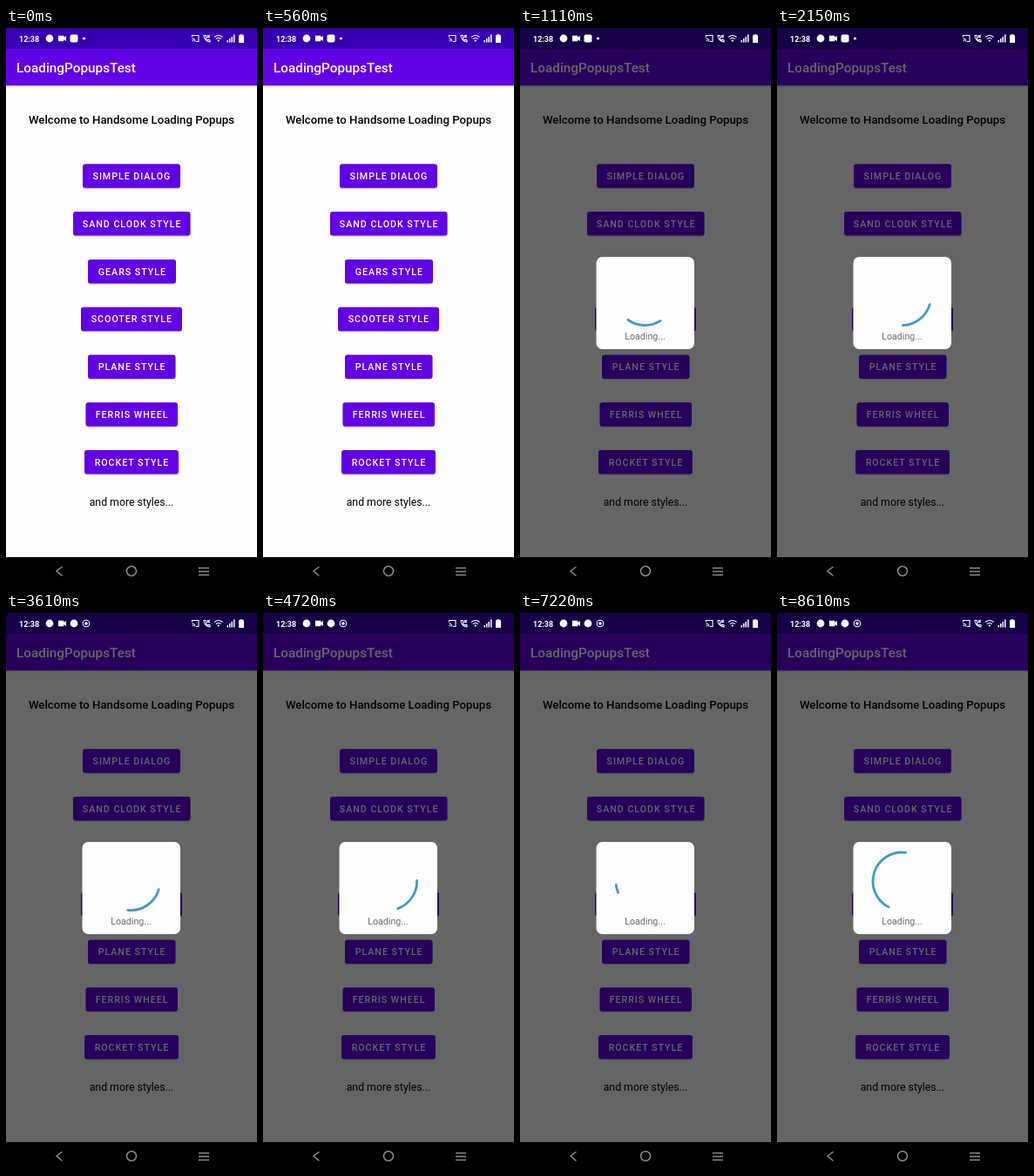
Write an HTML page that moves like this. It is 288 px wide and 640 px high and loops after 8680 ms.

```html
<!DOCTYPE html>
<html lang="en">
<head>
<meta charset="utf-8">
<title>Loading popup</title>
<style>
  html, body { margin: 0; width: 100%; height: 100%; overflow: hidden; background: #000; }
  svg {
    display: block; width: 288px; height: 640px;
    font-family: Roboto, "Noto Sans", sans-serif;
  }
  .bar { fill: #6200e6; }
  .label { fill: #fff; font-weight: 500; }
  .mid { text-anchor: middle; }
  .button { font-size: 10.7px; letter-spacing: .95px; }
  .line { fill: none; stroke: #fff; stroke-width: 1.1; }
  .nav { fill: none; stroke: #8c8c8c; stroke-width: 1.5; }
</style>
</head>
<body>
<svg viewBox="0 0 288 640">
  <rect width="288" height="640" fill="#fdfdfe"/>
  <rect y="66" width="288" height="1.5" opacity=".18"/>
  <rect class="bar" y="24" width="288" height="42"/>
  <rect width="288" height="24" fill="#3700b3"/>

  <text class="label" x="12" y="50.8" font-size="15.3">LoadingPopupsTest</text>
  <text class="mid" x="144" y="110.3" font-size="13.2" font-weight="500">Welcome to Handsome Loading Popups</text>
  <g id="buttons"></g>
  <text class="mid" x="144" y="549" font-size="12.3">and more styles...</text>

  <rect id="shade" width="288" height="608"/>

  <g fill="#fff">
    <text x="15" y="15.6" font-size="9" font-weight="700">12:38</text>
    <circle cx="50" cy="12" r="4.4"/>
    <path d="M60 8.7h6.3v2l2.7-1.7v6l-2.7-1.7v2H60z"/>
    <g id="early">
      <rect x="73.5" y="7.5" width="9" height="9" rx="2"/>
      <circle cx="89.5" cy="12" r="1.6"/>
    </g>
    <g id="late">
      <circle cx="78" cy="12" r="4.4"/>
      <circle class="line" cx="92" cy="12" r="3.8"/>
      <circle cx="92" cy="12" r="1.8"/>
    </g>
    <path class="line" d="M213.5 10.5V8.5h7.5v7h-3M213.5 12a3.5 3.5 0 0 1 3.5 3.5M213.5 14a1.5 1.5 0 0 1 1.5 1.5"/>
    <path class="line" d="M227 8.5c0 4 3 7 7 7.5v-2l-2-.6-1 1-2-2 1-1-.8-2.9zM231 10.500l3-2.500M231.500 8v2.500h2.500"/>
    <path class="line" d="M239 10.500q5-4 9.500 0M240.800 12.700q3-2.500 6 0"/>
    <path d="M242.300 14l1.500 2 1.500-2q-1.500-1-3 0zM253.500 14h1.500v2.500h-1.500zM256 12h1.500v4.500H256zM258.500 10h1.500v6.500h-1.500zM261 7.500h1.500v9H261zM268.500 7.300h3v1h1.500v8.700h-6V8.300h1.500z"/>
  </g>

  <g id="dialog">
    <rect x="87.5" y="263" width="112.5" height="106" rx="7" fill="#fdfdfe"/>
    <path id="arc" fill="none" stroke="#419bc4" stroke-width="2.8" stroke-linecap="round"/>
    <text class="mid" x="143.5" y="358" font-size="10.7" fill="#6b6b6b">Loading...</text>
  </g>

  <rect y="608" width="288" height="32"/>
  <path class="nav" d="M64.5 619l-6.5 5 6.500 5.500M221 620.500h12M221 624.500h12M221 628.500h12"/>
  <circle class="nav" cx="144" cy="624" r="5.5"/>
</svg>
<script>
const LOOP = 8680;
const $ = id => document.getElementById(id);
const clamp = x => Math.min(1, Math.max(0, x));
const lerp = (a, b, u) => a + (b - a) * u;

const labels = [
  ["SIMPLE DIALOG", 88, 200], ["SAND CLODK STYLE", 77, 211.5],
  ["GEARS STYLE", 94, 195], ["SCOOTER STYLE", 86, 202],
  ["PLANE STYLE", 94, 194.5], ["FERRIS WHEEL", 91.5, 197],
  ["ROCKET STYLE", 90, 198]
];
$("buttons").innerHTML = labels.map(([text, left, right], i) => {
  const y = 156.3 + i * 54.8;
  const box = `x="${left}" width="${right - left}" height="27.5" rx="3"`;
  return `<rect ${box} y="${y + 1}" opacity=".22"/><rect class="bar" ${box} y="${y}"/>
    <text class="label mid button" x="${(left + right) / 2 + .4}" y="${y + 17.6}">${text}</text>`;
}).join("");

// time, tail angle, head angle, number of pulses on the way to the next pose
const poses = [
  [690, -62, -60, 0], [760, -50, -44, 1], [2150, 376, 448, 1],
  [3610, 736, 816, 2], [5900, 1442, 1503, 1],
  [7220, 1957, 1973, 1], [8610, 2277, 2437, 0], [LOOP, 2302, 2454, 0]
];

function point(deg) {
  const a = deg * Math.PI / 180;
  return `${143.3 + 33.3 * Math.cos(a)} ${308.3 + 33.3 * Math.sin(a)}`;
}

function arcPath(t) {
  const i = Math.max(1, poses.findIndex(p => p[0] > t));
  const [t0, tail0, head0, pulses] = poses[i - 1];
  const [t1, tail1, head1] = poses[i];
  const u = clamp((t - t0) / (t1 - t0));
  const tail = lerp(tail0, tail1, u);
  const head = lerp(head0, head1, u) + 90 * Math.sin(Math.PI * u * pulses) ** 2;
  return `M${point(tail)}A33.3 33.3 0 ${head - tail > 180 ? 1 : 0} 1 ${point(head)}`;
}

function show(id, on) {
  $(id).style.display = on ? "" : "none";
}

function draw() {
  const t = performance.now() % LOOP;
  $("shade").style.opacity = .6 * clamp((t - 690) / 140);
  show("dialog", t >= 690);
  show("early", t < 2780);
  show("late", t >= 2780);
  $("arc").setAttribute("d", arcPath(t));
  requestAnimationFrame(draw);
}
draw();
</script>
</body>
</html>
```
